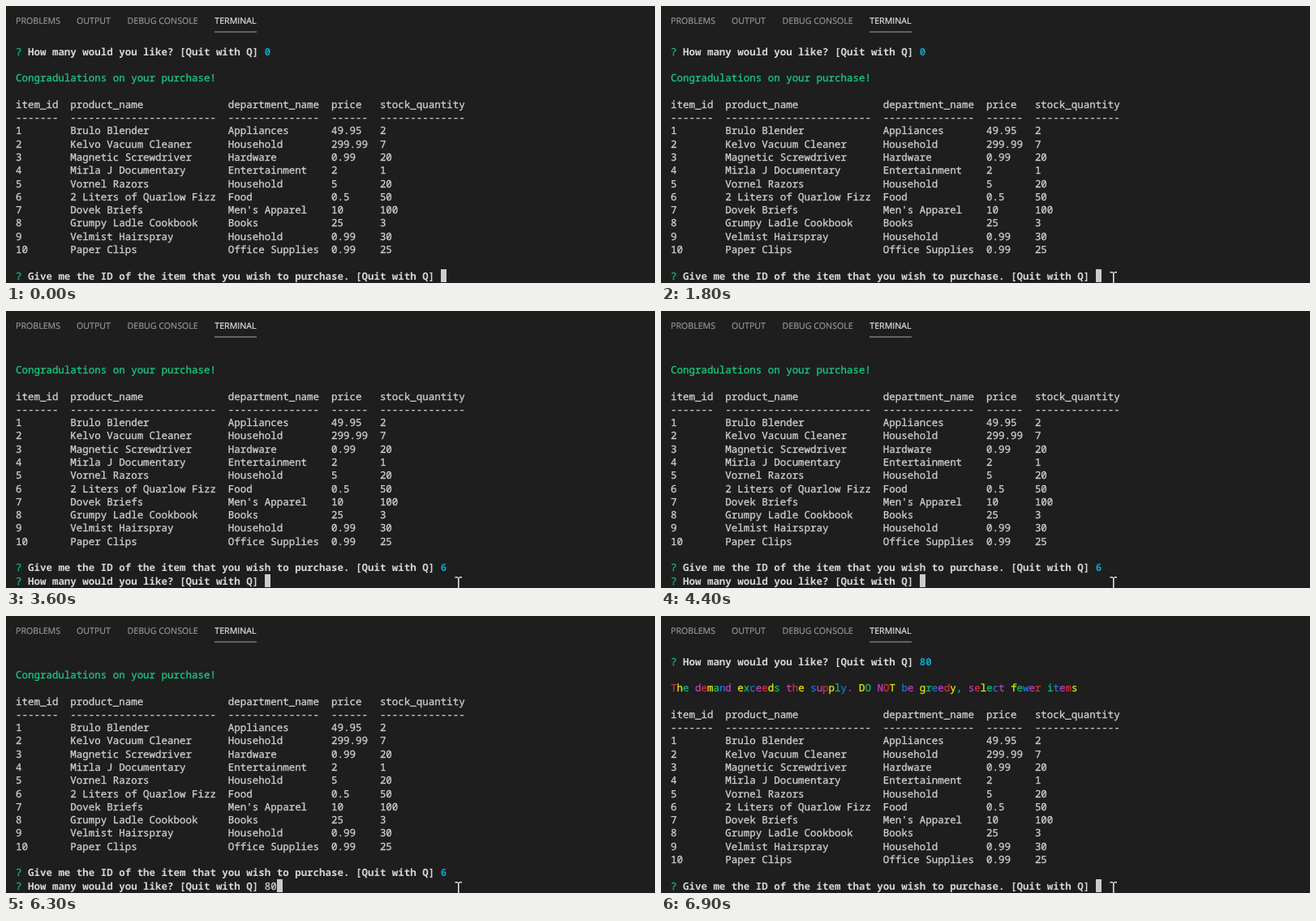
Write an HTML page that moves like this. It is 800x342 px and loops after 7.1 s.

```html
<!DOCTYPE html>
<html lang="en">
<head>
<meta charset="utf-8">
<title>Terminal shop</title>
<style>
html, body { margin: 0; width: 100%; height: 100%; overflow: hidden; background: #1e1e1e; }
body { position: relative; text-rendering: geometricPrecision; }
#tabs span { position: absolute; top: 10.5px; font: 10.65px/16px "Open Sans", sans-serif; color: #969696;
  white-space: pre; -webkit-text-stroke: .2px; }
#tabs .on { color: #e7e7e7; }
#tabs .on::after { content: ""; position: absolute; left: 0; right: 0; top: 20.5px; height: 2px; background: #626262; }
#term { position: absolute; left: 12px; top: 48.8px; margin: 0; color: #d0d0d0; -webkit-text-stroke: .3px;
  font: 12.47px/16.28px "Noto Sans Mono", "DejaVu Sans Mono", monospace; font-variant-ligatures: none; }
#term b { color: #d6d6d6; -webkit-text-stroke: 0; }
#block { position: absolute; top: 276.2px; width: 1ch; height: 16.3px; background: #ccc; }
#mouse { position: absolute; left: -5px; top: -8px; mix-blend-mode: difference; }
</style>
</head>
<body>
<div id="tabs">
  <span style="left:12px">PROBLEMS</span>
  <span style="left:87px">OUTPUT</span>
  <span style="left:149.5px">DEBUG CONSOLE</span>
  <span class="on" style="left:257.3px">TERMINAL</span>
</div>
<pre id="term"><span id="text"></span><span id="block"></span></pre>
<svg id="mouse" width="10" height="16" fill="none" stroke="#fff">
  <path d="M.5 .7H4M5.5 .7H9M.5 15.3H4M5.5 15.3H9" stroke-width="1.4" />
  <path d="M4.8 1V15" stroke-width="1.6" />
</svg>
<script>
const $ = id => document.getElementById(id);
const LOOP = 7100, STEP = 100;
const widths = [7, 24, 15, 6, 14];
const items = [
  ["Brulo Blender", "Appliances", "49.95", 2],
  ["Kelvo Vacuum Cleaner", "Household", "299.99", 7],
  ["Magnetic Screwdriver", "Hardware", "0.99", 20],
  ["Mirla J Documentary", "Entertainment", "2", 1],
  ["Vornel Razors", "Household", "5", 20],
  ["2 Liters of Quarlow Fizz", "Food", "0.5", 50],
  ["Dovek Briefs", "Men's Apparel", "10", 100],
  ["Grumpy Ladle Cookbook", "Books", "25", 3],
  ["Velmist Hairspray", "Household", "0.99", 30],
  ["Paper Clips", "Office Supplies", "0.99", 25]
];
const row = cells => cells.map((c, i) => String(c).padEnd(widths[i])).join("  ");
const table = [
  row(["item_id", "product_name", "department_name", "price", "stock_quantity"]),
  row(widths.map(w => "-".repeat(w))),
  ...items.map((item, i) => row([i + 1, ...item]))
];

const color = (c, s) => `<span style="color:${c}">${s}</span>`;
const hues = ["#cd3131", "#e5e510", "#0dbc79", "#2472c8", "#bc3fbc"];
const rainbow = s => [...s].map((c, i) => color(hues[i % 5], c)).join("");
const askId = "Give me the ID of the item that you wish to purchase. [Quit with Q] ";
const askCount = "How many would you like? [Quit with Q] ";
const prompt = q => `${color("#0dbc79", "?")} <b>${q}</b>`;
const answered = (q, a) => `${prompt(q)}<b>${color("#11a0c4", a)}</b>`;
const thanks = color("#1bc983", "Congradulations on your purchase!");
const greedy = rainbow("The demand exceeds the supply. DO NOT be greedy, select fewer items");

function screen(t) {
  const shop = (count, note) => [answered(askCount, count), "", note, "", ...table, ""];
  if (t < 3600) return [shop("0", thanks), askId, t < 3200 ? "" : "6"];
  if (t < 6500) return [
    ["", ...shop("0", thanks).slice(2), answered(askId, "6")],
    askCount, t < 6000 ? "" : t < 6200 ? "8" : "80"
  ];
  return [shop("80", greedy), askId, ""];
}

const ease = (t, a, b) => {
  const p = Math.min(1, Math.max(0, (t - a) / (b - a)));
  return p * p * (3 - 2 * p);
};

let last = "";
function draw(now) {
  const t = Math.floor(now % LOOP / STEP) * STEP;
  const [lines, question, typed] = screen(t);
  const html = [...lines, prompt(question) + typed].join("\n");
  if (html !== last) $("text").innerHTML = last = html;
  $("block").style.left = 2 + question.length + typed.length + "ch";

  const enter = ease(t, 100, 700), settle = ease(t, 900, 1300);
  const x = 608 - 62 * enter + 12 * settle, y = 330 + 6 * settle;
  $("mouse").style.transform = `translate(${Math.round(x)}px, ${Math.round(y)}px)`;
  $("mouse").style.visibility = t < 100 ? "hidden" : "visible";
  requestAnimationFrame(() => draw(performance.now()));
}
draw(performance.now());
</script>
</body>
</html>
```
